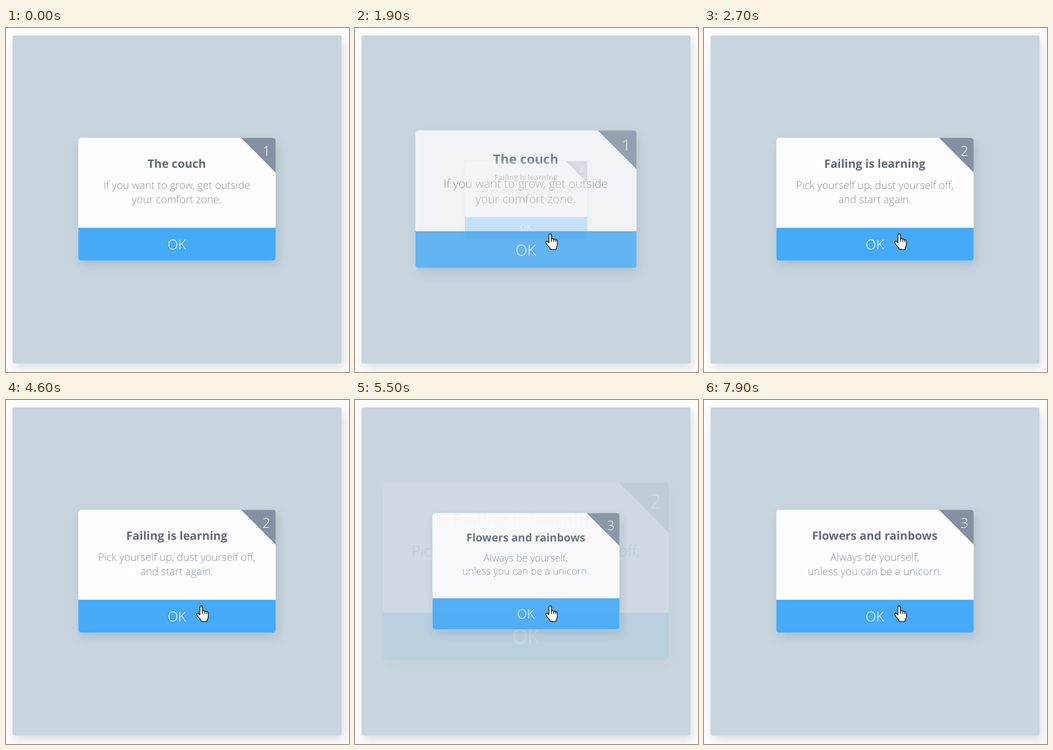
These frames come from a looping animation (600 px wide and 603 px high, 8000 ms). An HTML page:

```html
<!DOCTYPE html>
<html lang="en">
<head>
<meta charset="utf-8">
<title>Dialog cards</title>
<style>
  html, body { margin: 0; width: 100%; height: 100%; overflow: hidden; background: #fffdfe; }
  svg { display: block; width: 600px; height: 603px; font-family: "Open Sans", sans-serif; text-rendering: geometricPrecision; }
  text { text-anchor: middle; }
  .panel, .shade { filter: drop-shadow(4px 8px 9px rgba(50, 70, 90, .17)); }
  .panel { fill: #c8d5de; }
  .shade { fill: #fffdff; }
  .title { font-weight: 700; font-size: 20.24px; fill: #616b7a; }
  .body { font-weight: 300; font-size: 18.4px; fill: #84919d; }
  .ok, .count { font-weight: 300; font-size: 23.9px; fill: #fff; }
</style>
</head>
<body>
<svg viewBox="0 0 600 603">
  <defs>
    <clipPath id="round"><rect x="126.5" y="192.6" width="345.2" height="215.2" rx="4.6"/></clipPath>
  </defs>
  <rect class="panel" x="11.5" y="13" width="575.5" height="575.3" rx="3"/>
  <g id="cards"></g>
  <g id="cursor" stroke="#111" stroke-width="1.3" fill="#fff" stroke-linejoin="round" stroke-linecap="round">
    <path id="arrow" d="M0 0V16.5L3.8 13L6.4 19L9 17.9L6.4 12.1H11.8Z"/>
    <g id="hand">
      <path d="M-1.8 13.5V2C-1.8-1 2.8-1 2.8 2V8.8C3.6 7.5 6.5 7.8 6.7 9.6C7.6 8.4 10 8.9 10.1 10.6C11.3 9.8 13 10.6 13 12.4V18.5C13 21.5 10.8 23 10.6 27.3H0.6C0.4 23.5-4.5 20.5-7.2 15.7C-8.4 13-5 11.6-3.4 13.6L-1.8 15.8Z"/>
      <path d="M2.8 8.8V13.2M6.7 9.6V13.4M10.1 10.6V13.8" fill="none"/>
    </g>
  </g>
</svg>
<script>
const LOOP = 8000, SWAP = 800;
const CX = 299.1, CY = 300.2;
const SWAP_STARTS = [1576, 4957];
const MOVE = { start: 800, length: 650, from: [567, 432], to: [341, 361] };

const MESSAGES = [
  ["The couch", "If you want to grow, get outside", "your comfort zone."],
  ["Failing is learning", "Pick yourself up, dust yourself off,", "and start again."],
  ["Flowers and rainbows", "Always be yourself,", "unless you can be a unicorn."]
];

const byId = id => document.getElementById(id);
const clamp = v => Math.min(1, Math.max(0, v));
const label = (name, x, y, text) => `<text class="${name}" x="${x}" y="${y}">${text}</text>`;

const cardMarkup = ([title, first, second], i) => `<g>
  <rect class="shade" x="126.5" y="192.6" width="345.2" height="215.2" rx="4.6"/>
  <g clip-path="url(#round)">
    <path d="M410.7 192H472V253.7Z" fill="#8591a2"/>
    <rect x="126" y="350.2" width="346" height="58" fill="#45aaf8"/>
  </g>
  ${label("count", 455.6, 224, i + 1)}
  ${label("title", CX - .4, 244.6, title)}
  ${label("body", CX - .4, 282.2, first)}
  ${label("body", CX - .4, 306.6, second)}
  ${label("ok", CX - .3, 388, "OK")}
</g>`;

byId("cards").innerHTML = MESSAGES.map(cardMarkup).join("");
const cards = [...byId("cards").children];

const easeInOut = u => u < .5 ? .5 * (2 * u) ** 3.5 : 1 - .5 * (2 - 2 * u) ** 3.5;
const easeOut = u => 1 - (1 - u) ** 3;

function swapProgress(i, t) {
  if (i < 0) return 1;
  if (i >= SWAP_STARTS.length) return 0;
  return easeInOut(clamp((t - SWAP_STARTS[i]) / SWAP));
}

function drawCard(card, i, t) {
  const enter = swapProgress(i - 1, t), leave = swapProgress(i, t);
  const scale = .5 + .5 * enter + .5 * leave;
  const opacity = enter * (1 - leave);
  card.setAttribute("transform", `translate(${CX} ${CY}) scale(${scale}) translate(${-CX} ${-CY})`);
  card.setAttribute("opacity", opacity);
  card.style.display = opacity > .002 ? "" : "none";
}

function drawCursor(t) {
  const p = easeOut(clamp((t - MOVE.start) / MOVE.length));
  const [x, y] = MOVE.from.map((v, i) => v + (MOVE.to[i] - v) * p);
  const overButton = x < 471 && y > 350 && y < 408;
  byId("cursor").setAttribute("transform", `translate(${x} ${y})`);
  byId("cursor").style.display = t < MOVE.start ? "none" : "";
  byId("hand").style.display = overButton ? "" : "none";
  byId("arrow").style.display = overButton ? "none" : "";
}

function draw(t) {
  cards.forEach((card, i) => drawCard(card, i, t));
  drawCursor(t);
}

const begin = performance.now();
function tick() {
  draw((performance.now() - begin) % LOOP);
  requestAnimationFrame(tick);
}
tick();
</script>
</body>
</html>
```
